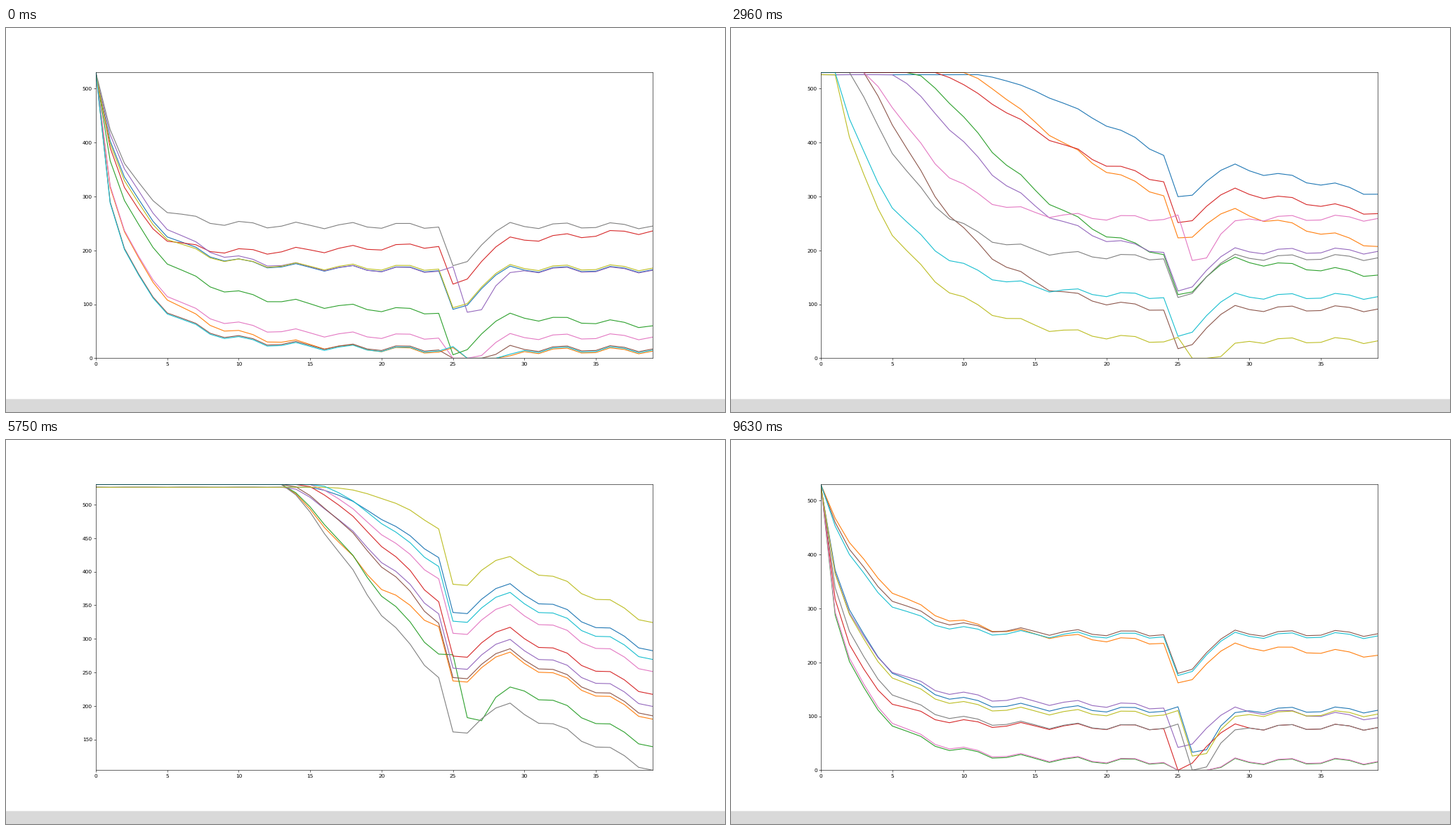
A matplotlib script that plays this animation: 1024 px wide and 547 px high, repeating every 9840 ms.

```python
import numpy as np
import matplotlib.pyplot as plt
from matplotlib.animation import FuncAnimation
from matplotlib.patches import Rectangle

W, H, DPI = 1024, 547, 64
UI = 5 / 6          # scale of fonts and strokes
LOOP, TICK = 9840, 30
X = np.arange(40)
TOP, HIT = 530, 24
SHOCK = [-80, -68, -30, -11]    # sudden loss after HIT, then recovery
TAUS = np.geomspace(0.2, 300, 400)


def decay(x, start, tau, p):
    """Stretched exponential: 1 up to start, 0 at HIT."""
    def e(t):
        return np.exp(-(np.maximum(t - start, 0) / tau) ** p)
    return np.maximum((e(x) - e(HIT)) / (1 - e(HIT)), 0)


def curve(n, start, probe, mid, level, drift, late, crest):
    """Fall from the top through (probe, mid) to level, shock, then drift."""
    base = level + drift * (X - HIT) / 15 * np.where(X < HIT, 0.6, 1)
    p = min(0.7 + level / 800 + 0.13 * start, 1.4)
    floor = np.interp(probe, X, base)
    share = (mid - floor) / (TOP - floor)
    tau = np.interp(share, decay(probe, start, TAUS, p), TAUS)
    top = TOP - 4 * (n % 4 == 0)
    y = base + (top - base) * decay(X, start, tau, p)
    hit = HIT + 1 + late
    y[hit:hit + len(SHOCK)] += SHOCK
    ripple = 6 * np.cos(2 * np.pi * (X - crest) / 3.7)
    return np.clip(y + ripple * gate(y), 0, top)


def gate(y):
    """Fade small swings out near the ceiling and near zero."""
    return np.clip((TOP - y) / 150, 0, 1) * np.clip(y / 12, 0, 1)


def scene(mids, levels, starts=(0,) * 10, reach=3, trend=0, drifts={},
          late=(), crest=10.4):
    return np.array([
        curve(n, s, s + reach, m, v, drifts.get(n, trend), n in late, crest)
        for n, (m, v, s) in enumerate(zip(mids, levels, starts))])


opening = scene([290, 180, 242, 270, 306, 150, 183, 320, 283, 148],
                [165, 14, 86, 210, 164, 18, 40, 246, 168, 16],
                drifts={2: -25, 3: 27}, late=(1, 4, 9))
spread = scene([268, 158, 236, 216, 277, 168, 233, 242, 360, 255],
               [163, 18, 55, 140, 164, 16, 55, 196, 215, 115],
               drifts={3: 50, 7: 34}, late=(2, 3, 9), crest=8.3)
staggered = scene([487, 438, 401, 456, 400, 303, 364, 312, 199, 251],
                  [379, 304, 195, 330, 199, 92, 260, 187, 33, 115],
                  [11, 10, 6.5, 8, 5, 3, 3, 2, 1, 1], reach=5,
                  drifts={0: -74, 1: -96, 2: -40, 3: -61}, late=(6, 8))
early = scene([316, 207, 279, 314, 386, 253, 288, 457, 437, 348],
              [155, 14, 66, 188, 178, 19, 56, 274, 172, 62],
              [0, 0, 0, 0, 0, 0, 0.5, 1.5, 1, 1],
              drifts={3: 45}, late=(0, 4, 7, 9))
delayed = scene([467, 398, 394, 430, 429, 422, 440, 368, 492, 449],
                [423, 321, 280, 358, 340, 326, 392, 245, 465, 410],
                [15, 13, 13, 14.5, 13.5, 13.5, 15, 13, 16, 15.5], reach=6,
                trend=-140, late=(2,))
settled = scene([237, 296, 276, 221, 329, 348, 231, 186, 308, 184],
                [152, 160, 70, 112, 190, 224, 115, 88, 210, 75],
                drifts={0: 50, 2: -46, 7: 43}, late=(0, 2, 5))
closing = scene([248, 386, 148, 182, 244, 371, 154, 205, 239, 360],
                [112, 238, 16, 80, 118, 254, 17, 80, 105, 250],
                drifts={1: -24, 4: -20}, late=(0, 7, 8))

# Runs at fixed steps; the steps between them are blends with their own noise
KEYS = [(0, opening), (4, spread), (10, staggered),
        (13, (staggered + delayed) / 2), (16, early), (19, delayed),
        (27, settled), (32, closing)]


def run(step):
    for (i, a), (j, b) in zip(KEYS, KEYS[1:]):
        if i <= step <= j:
            t = (step - i) / (j - i)
            break
    y = a + (b - a) * t
    if 0 < t < 1:
        noise = np.random.default_rng(step).normal(0, 3.5, y.shape)
        y = np.clip(y + noise * gate(y), 0, TOP)
    return y


# Moment at which each step appears, in ms
STEP_AT = np.interp(np.arange(33), [0, 1, 4, 5, 10, 16, 19, 20, 27, 28, 32],
                    [0, 230, 1150, 1500, 2960, 4770, 5750, 6010, 8150, 8420, 9630])
RUNS = [run(s) for s in range(len(STEP_AT))]

plt.rcParams.update({
    "font.family": "DejaVu Sans", "font.size": 10 * UI, "text.hinting": "none",
    "axes.linewidth": 0.8 * UI, "lines.linewidth": 1.5 * UI,
    "xtick.major.size": 3.5 * UI, "ytick.major.size": 3.5 * UI,
    "xtick.major.pad": 3.5 * UI, "ytick.major.pad": 3.5 * UI,
    "xtick.major.width": 0.8 * UI, "ytick.major.width": 0.8 * UI,
})
fig = plt.figure(figsize=(W / DPI, H / DPI), dpi=DPI, facecolor="white")
fig.add_artist(Rectangle((0, 0), 1, 18.4 / H, transform=fig.transFigure,
                         facecolor="#d9d9d9", edgecolor="none", snap=False))
ax = fig.add_axes([128 / W, (H - 470.4) / H, 793.4 / W, 407 / H])
ax.set_xlim(0, 39)
lines = [ax.plot(X, X, color=f"C{n}")[0] for n in range(10)]


def draw(tick):
    step = np.searchsorted(STEP_AT, tick * TICK + 20, side="right") - 1
    curves = RUNS[step]
    for line, y in zip(lines, curves):
        line.set_ydata(y)
    ax.set_ylim(curves.min(), curves.max())
    return lines


anim = FuncAnimation(fig, draw, frames=LOOP // TICK, interval=TICK,
                     init_func=lambda: draw(0), repeat=True, repeat_delay=0,
                     blit=False)
plt.show()
```
